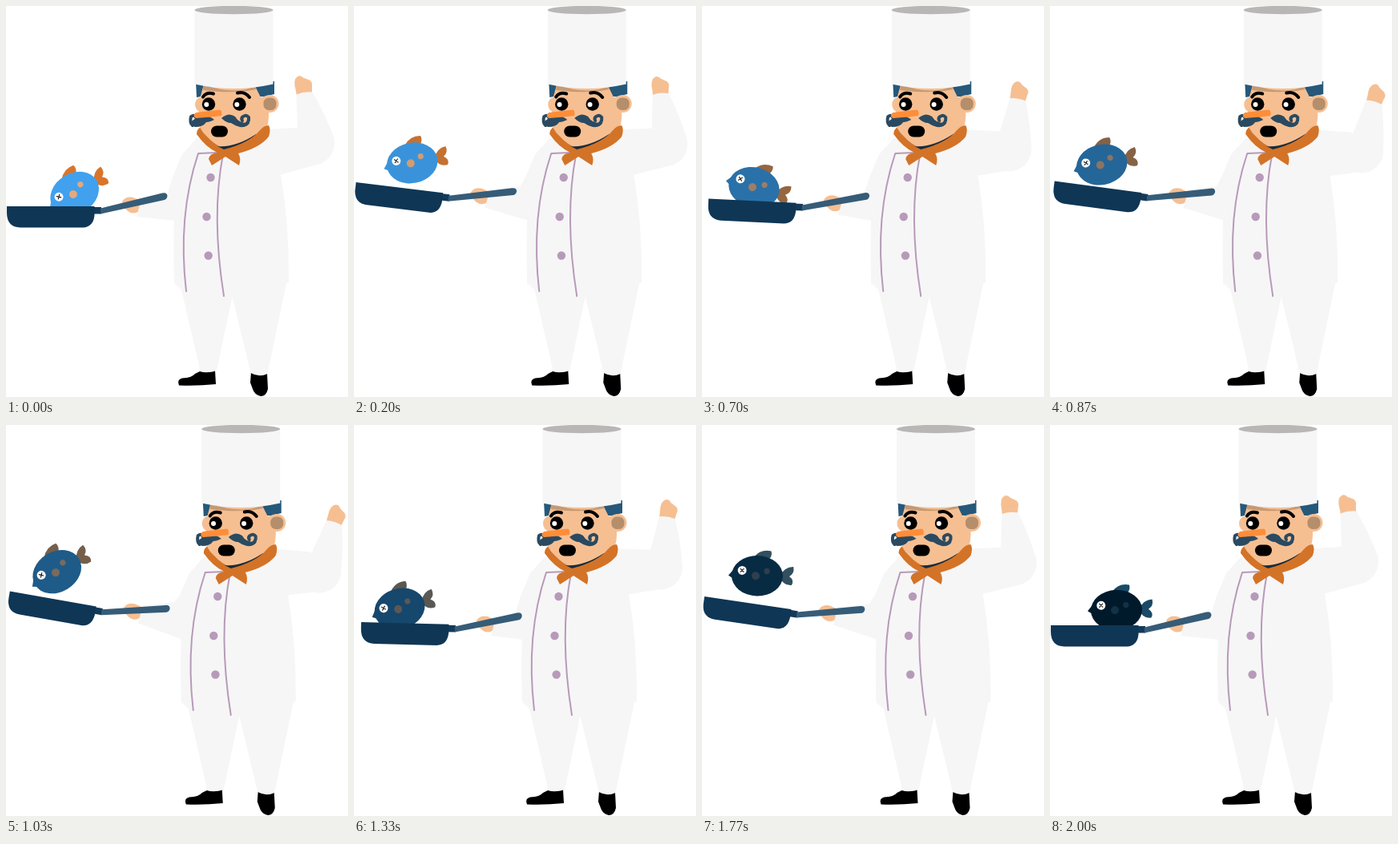
Write an HTML page that moves like this. It is 427x488 px and loops after 2.03 s.

```html
<!DOCTYPE html>
<html lang="en">
<head>
<meta charset="utf-8">
<title>Chef tossing a fish</title>
<style>
  html, body { margin: 0; width: 100%; height: 100%; overflow: hidden; background: #fff; }
  svg { display: block; width: 427px; height: 488px; }
  .cloth { fill: #f6f6f6; }
  .skin { fill: #f6bf92; }
  .navy { fill: #26587a; }
  .scarf { fill: #d37327; }
  .line { fill: none; stroke-linecap: round; stroke-linejoin: round; }
  .trim { stroke: #b79ab9; stroke-width: 2; }
  .brow { stroke: #000; stroke-width: 4; }
  .curl { stroke: #2a4a61; stroke-width: 4; }
  .button { fill: #b79ab9; }
</style>
</head>
<body>
<svg viewBox="0 0 427 488">
  <path id="panHand" class="skin" d="M-10 -4Q-5 -11 4 -9L15 -4L11 8Q4 13 -3 8Q-9 3 -10 -4Z"/>
  <path id="sleeve" class="cloth"/>

  <g id="chef">
    <g id="upperArm">
      <g id="foreArm">
        <path class="skin" d="M363 112L361.500 104Q358 92 364 88Q368 86 371 89.500L379 92.500Q383 95 382 100V111Z"/>
        <path class="cloth" d="M362.500 110.500Q372 106.500 382.500 107.500Q397 132 409 163C413 178 405 192 392 197L365 200L364 148Z"/>
      </g>
      <path class="cloth" d="M300 156L330 154L368 151.500L392 180L394 196.500L345 210L300 225Z"/>
    </g>

    <path d="M242 456Q252 459 261 454.500L262 472Q238 474.500 216 473.500Q213 466 220 464.500Q232 464 236 459Z"/>
    <path d="M306 457Q316 463 326 458.500L327 478Q325 487 318 487Q310 485 308 478L305 470Z"/>
    <path class="cloth" d="M241 164Q227 178 221 201L211 240Q208 295 210 346L219 354L242.500 455Q253 459 263 455L282.500 363L305.500 458Q316 464 326.500 459L350 346L353 345Q354 275 343 210L331 154L285 150Z"/>

    <path class="line trim" d="M264 183L240 184Q214 262 225 356M271 185Q256 262 272 362"/>
    <g class="button">
      <circle cx="255.500" cy="214" r="5.200"/>
      <circle cx="250.500" cy="263" r="5.200"/>
      <circle cx="252.700" cy="311.500" r="5.200"/>
    </g>

    <path class="scarf" d="M243 151Q238 154 238 160Q250 177 264 183Q254 184 253 191L257 199L274 188L291 199Q294 190 290 184L285 172Z"/>
    <path class="navy" d="M237 94H335V110L322 113H243L238 114Z"/>
    <ellipse class="skin" cx="243" cy="123" rx="7" ry="9"/>
    <circle class="skin" cx="329.500" cy="122" r="11"/>
    <path class="skin" d="M246 101L242 116L240 142Q241 154 250 162Q262 175 273 177.500Q304 175 322 158Q329 150 328 128L327 112L318 114L311 100Z"/>
    <path fill="#182c3c" d="M264 175Q286 177 312 160L316 164L292 180L272 179Z"/>
    <path class="scarf" d="M328 149Q322 149 317 155Q304 171 272 179L280 187L290 184Q317 177 328 163Q331 154 328 149Z"/>
    <path fill="#c59a74" d="M246 98Q285 112 312 100V104Q286 110 246 105Z"/>
    <rect x="321.500" y="114.500" width="16" height="15.500" rx="6.500" fill="#b58e6c"/>

    <path class="cloth" d="M235.500 5V97.500Q285 108.500 333.500 97.500V5Z"/>
    <ellipse cx="284.500" cy="5" rx="49" ry="5.200" fill="#b9b6b6"/>

    <path class="line brow" d="M246 113.500Q250 107 259 109.500M289 108.500Q298 106 304 114"/>
    <circle cx="253" cy="122.500" r="8.200"/>
    <circle cx="291.500" cy="122.500" r="8.200"/>
    <g fill="#fff">
      <circle cx="250.300" cy="123" r="3"/>
      <circle cx="288.300" cy="123" r="3"/>
    </g>
    <path fill="#2a4a61" d="M229 147Q238 136 249 137Q256 138 260 142Q254 145 250 145Q246 151 236 151ZM269 140Q278 132 286 138Q291 147 304 146Q301 152 292 151Q285 149 281 146Q275 146 269 140Z"/>
    <path class="line curl" d="M233 149Q229 145 231 138Q235 135 237 139M296 149Q304 147 303 139Q300 135 296 138Q293 140 295 143"/>
    <path fill="#ff8d38" d="M237 133Q251 131 267 129.500Q270 130 269 137Q253 139 237 140Q232 137 237 133Z"/>
    <rect x="256" y="149.500" width="21" height="14" rx="7"/>
  </g>

  <g id="fish">
    <g id="fins">
      <path d="M-6 -23Q3 -34 16 -31Q18 -25 12 -19Z"/>
      <path d="M27 0Q33 -12 44 -12Q46 -4 39 0Q46 5 42 11Q31 12 27 0Z"/>
    </g>
    <g id="fishBody">
      <ellipse cx="-1" rx="32" ry="25.200"/>
      <path d="M-26 -15L-31 -7L-37 0L-31 4L-26 15Z"/>
    </g>
    <g id="spots">
      <circle cx="-3" r="5"/>
      <circle cx="11" cy="-6" r="3.600"/>
    </g>
    <circle cx="-20" cy="-6.500" r="5.500" fill="#fff"/>
    <path class="line" stroke="#222" stroke-width="1.200" d="M-22 -8.500L-18 -4.500M-18 -8.500L-22 -4.500"/>
  </g>

  <g id="pan">
    <path fill="#143a58" d="M106 251H119V259.500H106Z"/>
    <path fill="#365c78" d="M118 252.500L195 233.500Q201 232 201.500 237Q201 241 198 242L118 259.500Z"/>
    <path fill="#0f3655" d="M1 250H110.500V261Q109 276 96 276.500H18Q1 276 1 258Z"/>
  </g>
</svg>

<script>
  const LOOP = 2030, TICK = 100 / 3, SPAN = 8, LAST = 48;

  // Poses at every eighth drawing; straight lines between them.
  const poses = {
    sway:   [0, 10, 0, 10, 0, 10, 0],
    wave:   [0, 6, 17.5, 28, 17, 5.5, 0],
    tilt:   [0, 11.2, 1.5, 11.2, 1.5, 11.2, 0],
    handX:  [155, 156, 163, 156, 163, 156, 155],
    handY:  [248, 230, 248, 230, 248, 230, 248],
    fishX:  [86.5, 66, 66, 65.5, 58, 65.3, 84],
    fishY:  [233.5, 173, 234, 176, 229, 174, 231],
    fishA:  [-31, 0, 20, -33, -17, 2, -2]
  };
  const burn = {
    fishBody: [[65, 161, 238], [0, 26, 44]],
    fins:     [[217, 117, 43], [26, 74, 102]],
    spots:    [[232, 168, 122], [20, 48, 68]]
  };

  const el = id => document.getElementById(id);
  const mix = (a, b, k) => a + (b - a) * k;
  const move = (id, value) => el(id).setAttribute('transform', value);

  function poseAt(n) {
    const i = Math.min(Math.floor(n / SPAN), LAST / SPAN - 1);
    const k = n / SPAN - i;
    const pose = {};
    for (const key in poses) pose[key] = mix(poses[key][i], poses[key][i + 1], k);
    return pose;
  }

  function sleevePath(x, y, sway) {
    const points = [
      [x + 14, y - 7], [sway + 201, y - 11], [sway + 208, 213], [sway + 220, 185],
      [sway + 239, 164], [sway + 265, 240], [sway + 212, 268], [x + 8, y + 15]
    ];
    return 'M' + points.join('L') + 'Z';
  }

  function draw(n) {
    const p = poseAt(n);
    move('chef', `translate(${p.sway} 0)`);
    move('upperArm', `rotate(${p.wave / 3} 325 175)`);
    move('foreArm', `rotate(${p.wave * 2 / 3} 376 172)`);
    move('panHand', `translate(${p.handX} ${p.handY})`);
    move('pan', `translate(${p.handX} ${p.handY}) rotate(${p.tilt}) translate(-155 -248)`);
    move('fish', `translate(${p.fishX} ${p.fishY}) rotate(${p.fishA})`);
    el('sleeve').setAttribute('d', sleevePath(p.handX, p.handY, p.sway));
    for (const id in burn) {
      const [raw, burnt] = burn[id];
      const rgb = raw.map((c, i) => Math.round(mix(c, burnt[i], n / LAST)));
      el(id).setAttribute('fill', `rgb(${rgb})`);
    }
  }

  // 24 drawings a second, shown on a 30 Hz beat.
  const start = performance.now();
  function loop() {
    const t = (performance.now() - start) % LOOP;
    const tick = Math.floor((t + 3.4) / TICK);
    draw(Math.min(LAST, Math.floor(tick * 0.8 + 0.3)));
    requestAnimationFrame(loop);
  }
  loop();
</script>
</body>
</html>
```
